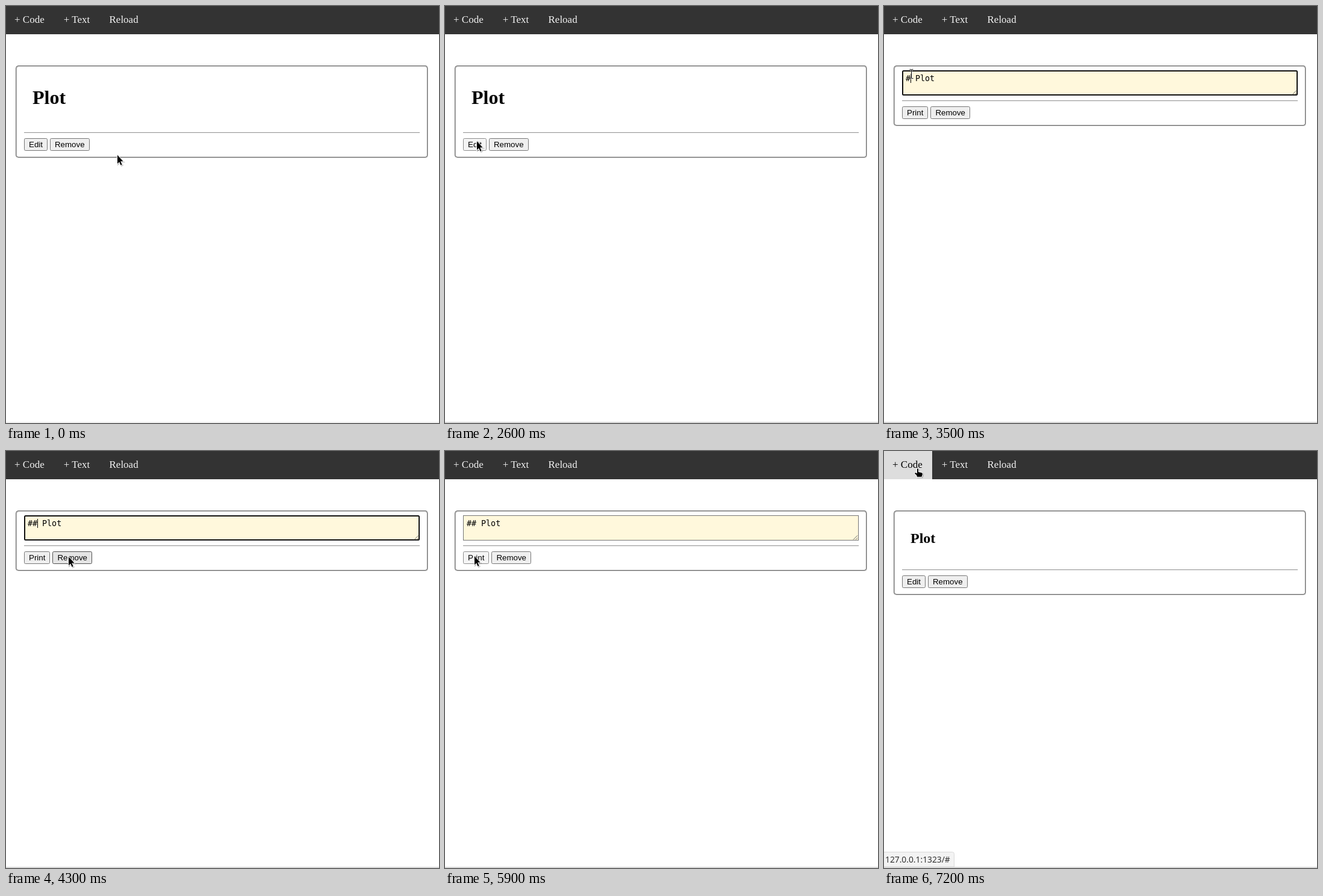
Animation, 719 px wide and 694 px high, one loop 8000 ms. Source, as an HTML page:

```html
<!DOCTYPE html>
<html lang="en">
<head>
<meta charset="utf-8">
<title>Notebook cell</title>
<style>
  html, body { margin: 0; width: 100%; height: 100%; overflow: hidden; background: #fff; }
  svg { display: block; width: 719px; height: 694px; }
  text { white-space: pre; }
  .nav { font: 17px "Liberation Serif", serif; fill: #f2f2f2; }
  .heading { font-family: "Liberation Serif", serif; font-weight: bold; }
  .button { font: 13.333px "Liberation Sans", sans-serif; }
  .code { font: 13.333px "DejaVu Sans Mono", monospace; }
  .status { font: 13.8px "Noto Sans", sans-serif; fill: #333; }
  .card { box-sizing: border-box; height: 100%; border: 2px groove #c0c0c0; border-radius: 5px; }
</style>
</head>
<body>
<svg id="stage" viewBox="0 0 719 694"></svg>
<script>
const stage = document.getElementById('stage');
const LOOP = 8000, STEP = 100;

// Each move runs from the previous stop, bowed sideways by its bend.
const moves = [
  { from: 0, to: 1100, x: 53, y: 269, bendY: -22 },
  { from: 1200, to: 1600, x: 53, y: 225 },
  { from: 2700, to: 3200, x: 45, y: 113 },
  { from: 3500, to: 3800, x: 104, y: 176, bendY: 30 },
  { from: 4800, to: 5000, x: 60, y: 175 },
  { from: 5100, to: 5600, x: 49, y: 175, bendX: -50, bendY: 44 },
  { from: 6000, to: 6600, x: 56, y: 38, bendX: 20, bendY: 140 },
  { from: 6600, to: 7200, x: 56, y: 29 }
];

function pointerAt(t) {
  let x = 185, y = 248;
  for (const m of moves) {
    const k = Math.min(1, Math.max(0, (t - m.from) / (m.to - m.from)));
    const bow = Math.sin(Math.PI * k);
    x += (m.x - x) * k + (m.bendX || 0) * bow;
    y += (m.y - y) * k + (m.bendY || 0) * bow;
    if (k < 1) break;
  }
  return { x: Math.round(x), y: Math.round(y) };
}

const inside = (p, x, y, w, h) => p.x >= x && p.x < x + w && p.y >= y && p.y < y + h;

const rect = (x, y, w, h, fill, extra = '') =>
  `<rect x="${x}" y="${y}" width="${w}" height="${h}" fill="${fill}" ${extra}/>`;

const outline = (x, y, w, h, color, r, fill) =>
  rect(x + .5, y + .5, w - 1, h - 1, fill, `rx="${r}" stroke="${color}"`);

const text = (x, y, cls, value, extra = '') =>
  `<text x="${x}" y="${y}" class="${cls}" ${extra}>${value}</text>`;

function button(x, y, w, label, p, pressed) {
  const left = Math.round(x);
  const [fill, edge] = !inside(p, left, y, w, 21) ? ['#efefef', '#767676']
    : pressed ? ['#f5f5f5', '#8d8d8d'] : ['#e5e5e5', '#4f4f4f'];
  return outline(left, y, w, 21, edge, 2, fill) + text(x + 8, y + 15, 'button', label);
}

function card(bottom) {
  const ruleY = bottom - 43;
  return `<foreignObject x="16" y="99" width="685" height="${bottom - 99}"><div class="card"></div></foreignObject>` +
    rect(30, ruleY, 657, 1, '#9a9a9a') + rect(30, ruleY + 1, 657, 1, '#eee');
}

function navbar(p) {
  const hover = inside(p, 0, 0, 80, 47);
  return rect(0, 0, 719, 47, '#333') +
    (hover ? rect(0, 0, 80, 47, '#ddd') : '') +
    text(14, 28, 'nav', '+ Code', hover ? 'style="fill:#000"' : '') +
    text(95.7, 28, 'nav', '+ Text') + text(171.5, 28, 'nav', 'Reload');
}

function preview(size, baseline, bottom, p, pressed) {
  const y = bottom - 33;
  return card(bottom) +
    text(44, baseline, 'heading', 'Plot', `font-size="${size}"`) +
    button(30, y, 39, 'Edit', p, pressed) + button(72.97, y, 66, 'Remove', p);
}

function editor(t, p) {
  const focused = t >= 3500 && t < 5800;
  const typed = t >= 4300;
  const blinkStart = typed ? 4300 : 3500;
  const caretOn = focused && (t - blinkStart) % 1200 < 600;
  const box = focused
    ? rect(31, 108, 655, 40, '#fff8dc', 'rx="1.5" stroke="#101010" stroke-width="2"')
    : outline(30, 107, 657, 42, '#767676', 0, '#fff8dc');
  return card(200) + box +
    '<path d="M678 147.500l7-7M682 147.500l3-3" stroke="#666" fill="none"/>' +
    text(36, 125, 'code', (typed ? '##' : '#') + ' Plot') +
    (caretOn ? rect(typed ? 52 : 44, 113, 1, 15, '#000') : '') +
    button(30, 167, 43, 'Print', p, t >= 5800) + button(77.4, 167, 66, 'Remove', p);
}

const shapes = {
  arrow: 'M0 0V14.500L3.200 11.500 5.600 17 7.600 16 5.200 10.600H9.500Z',
  hand: 'M-1 1Q0-1 1 1V6L6 7Q8 7.500 8 9.500L6.500 14H-1L-2 11-5 8.500Q-4.500 6.500-2.500 7.500L-1 8.500Z',
  beam: 'M-3-7.500H-1L0-7 1-7.500H3M0-7V7M-3 7.500H-1L0 7 1 7.500H3'
};

function pointer(p, editing) {
  if (editing && inside(p, 30, 107, 657, 42)) {
    return `<g transform="translate(${p.x + .5} ${p.y})" fill="none">` +
      `<path d="${shapes.beam}" stroke="#fff" stroke-width="2.500" opacity=".7"/>` +
      `<path d="${shapes.beam}" stroke="#000"/></g>`;
  }
  const d = p.y < 47 ? shapes.hand : shapes.arrow;
  return `<g transform="translate(${p.x} ${p.y})">` +
    `<path d="${d}" transform="translate(1 1)" stroke="#000" stroke-width="2" opacity=".25"/>` +
    `<path d="${d}" stroke="#fff" stroke-width="1.800" paint-order="stroke"/></g>`;
}

function status(t) {
  const opacity = Math.min(1, Math.max(0, (t - 6600) / 600));
  return `<g opacity="${opacity}">` +
    '<path d="M-1 667.500H113.500Q116.500 667.500 116.500 670.500V692H-1Z" fill="#f3f3f3" stroke="#d9d9d9"/>' +
    text(2, 685, 'status', '127.0.0.1:1323/#') + '</g>';
}

function draw(t) {
  const p = pointerAt(t);
  const editing = t >= 2700 && t < 6000;
  const cell = editing ? editor(t, p)
    : t < 2700 ? preview(32, 163, 253, p, t >= 2600)
    : preview(24, 153, 240, p, false);
  stage.innerHTML = rect(0, 0, 719, 694, '#fff') + navbar(p) + cell + status(t) +
    rect(0, 692, 719, 2, t < 2600 ? '#f0f0f0' : '#d9d9d9') + pointer(p, editing);
}

let start, last;
function tick(now) {
  start ??= now;
  const t = Math.floor((now - start) % LOOP / STEP) * STEP;
  if (t !== last) draw(last = t);
  requestAnimationFrame(tick);
}
draw(0);
requestAnimationFrame(tick);
</script>
</body>
</html>
```
